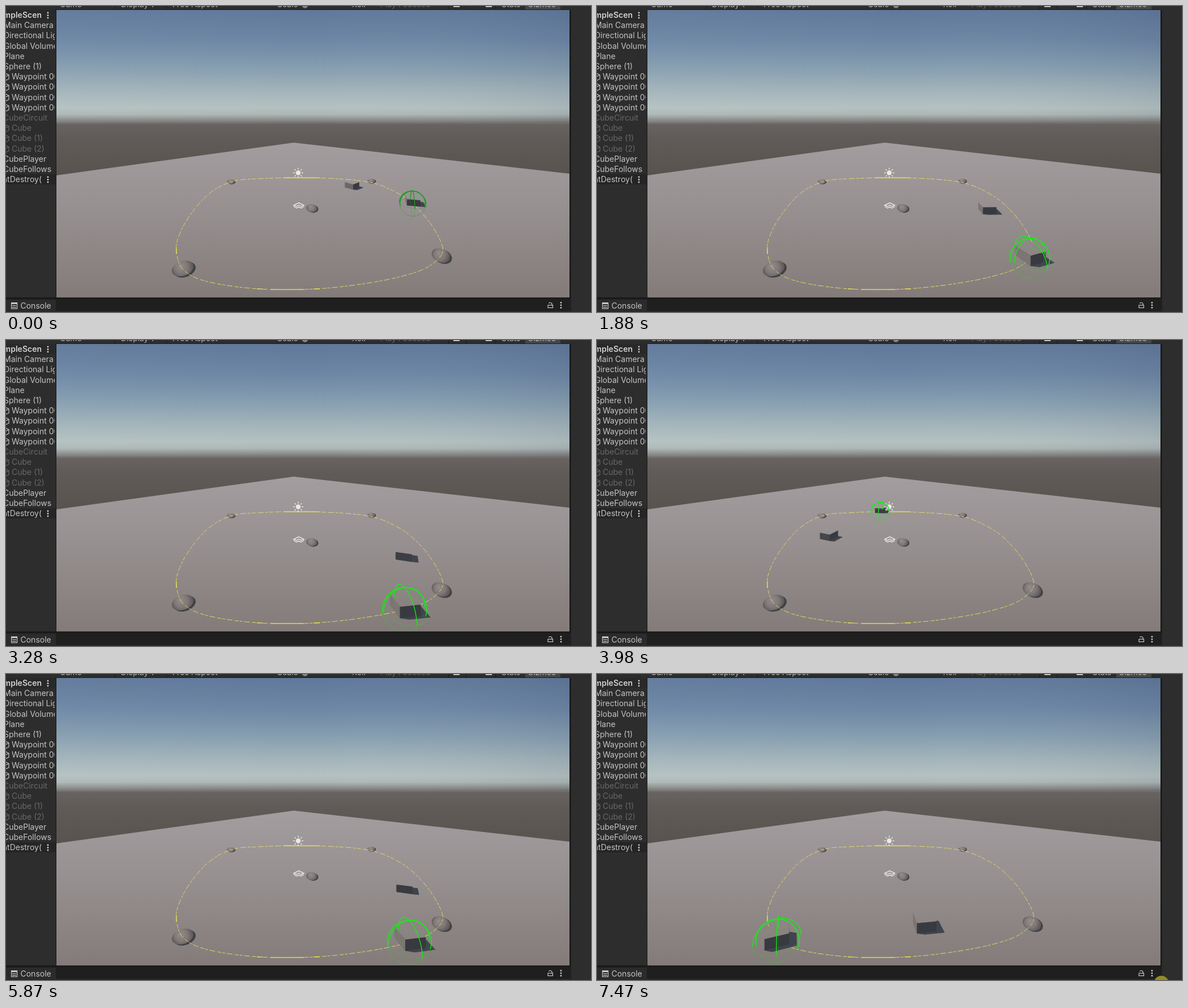
An HTML page with a canvas for the animation above (7680 ms loop, 1033 by 542 pixels).

```html
<!DOCTYPE html>
<html lang="en">
<head>
<meta charset="utf-8">
<title>Waypoint circuit</title>
<style>
html, body { margin: 0; width: 100%; height: 100%; overflow: hidden; background: #2d2d2d; }
canvas { display: block; }
</style>
</head>
<body>
<canvas id="stage" width="1033" height="542"></canvas>
<script>
const ctx = document.getElementById('stage').getContext('2d');
const LOOP = 7680;
const FONT = 'Inter, Roboto, sans-serif';
const VIEW = { x: 89, y: 7, w: 906, h: 510 };
const CAM = { x: 542, horizon: 180, focal: 441 };
const CUBE = 0.064, BALL = 0.131;

// Bursts of evenly spaced screen updates: start, end, count
const BURSTS = [
  [0, 0, 1], [70, 820, 12], [880, 1640, 12], [1710, 2440, 11], [2510, 3210, 11],
  [3280, 3980, 11], [4050, 4760, 11], [4830, 5590, 12], [5660, 6360, 11],
  [6430, 7190, 12], [7260, 7470, 4]
];

const CIRCUIT = [
  [358, 333], [399, 311], [445, 306], [520, 304], [600, 307], [650, 314], [687, 329],
  [718, 350], [750, 386], [771, 428], [760, 451], [725, 471], [650, 489], [548, 501],
  [445, 501], [355, 488], [313, 467], [301, 435], [305, 408], [324, 372]
];

// When the player passes which spot of the circuit
const PASSES = [
  [0, 718, 349], [820, 532, 501], [1150, 358, 333], [1640, 687, 328], [2440, 357, 333],
  [3280, 705, 482], [3980, 500, 304], [4690, 395, 497], [5590, 692, 331], [5870, 715, 480],
  [6360, 378, 321], [7190, 748, 460], [7470, 317, 474]
];

// Player spot -> follower spot
const CHASE = [
  [358, 333, 381, 395], [480, 305, 402, 355], [600, 307, 465, 333], [687, 329, 545, 325],
  [718, 349, 611, 321], [771, 428, 676, 355], [705, 482, 702, 385], [395, 497, 641, 431],
  [317, 474, 578, 447], [304, 410, 460, 432]
];

const WAYPOINTS = [
  [397, 311, 7, 4, 0], [645, 310, 7, 4, 0], [540, 358, 10, 7, 0.1],
  [768, 442, 17, 12, 0.4], [312, 465, 20, 13, -0.35]
];

const lerp = (a, b, k) => a + (b - a) * k;
const mod1 = v => v - Math.floor(v);
const toWorld = ([x, y]) => [(x - CAM.x) / (y - CAM.horizon), CAM.focal / (y - CAM.horizon)];
const project = (x, y, z) => [CAM.x + CAM.focal * x / z, CAM.horizon + CAM.focal * (1 - y) / z];

function spline(p, q, r, s, k) {
  return p.map((_, i) => 0.5 * (2 * q[i] + (r[i] - p[i]) * k +
    (2 * p[i] - 5 * q[i] + 4 * r[i] - s[i]) * k * k +
    (3 * q[i] - p[i] - 3 * r[i] + s[i]) * k * k * k));
}

function closedSpline(points, i, k) {
  const n = points.length, at = j => points[(i + j + n) % n];
  return spline(at(-1), at(0), at(1), at(2), k);
}

const track = [];
CIRCUIT.forEach((_, i) => {
  for (let k = 0; k < 24; k++) track.push({ p: closedSpline(CIRCUIT, i, k / 24) });
});
let trackLength = 0;
track.forEach((s, i) => {
  s.at = trackLength;
  const a = toWorld(s.p), b = toWorld(track[(i + 1) % track.length].p);
  trackLength += Math.hypot(b[0] - a[0], (b[1] - a[1]) * 0.75);
});
track.forEach(s => s.at /= trackLength);

function onTrack(lap) {
  const u = mod1(lap);
  let i = track.findIndex(s => s.at > u);
  if (i < 0) i = track.length;
  const a = track[i - 1], b = track[i % track.length];
  const k = (u - a.at) / ((i < track.length ? b.at : 1) - a.at);
  return [lerp(a.p[0], b.p[0], k), lerp(a.p[1], b.p[1], k)];
}

function lapAt(x, y) {
  const gap = s => Math.hypot(s.p[0] - x, s.p[1] - y);
  return track.reduce((best, s) => gap(s) < gap(best) ? s : best).at;
}

const timeline = [];
PASSES.forEach(([t, x, y]) => {
  let lap = lapAt(x, y);
  const last = timeline.length ? timeline[timeline.length - 1].lap : 0;
  while (lap < last) lap++;
  timeline.push({ t, lap });
});

function playerLap(t) {
  let i = 0;
  while (i < timeline.length - 2 && t >= timeline[i + 1].t) i++;
  const a = timeline[i], b = timeline[i + 1];
  const k = Math.min(1, (t - a.t) / (b.t - a.t));
  return lerp(a.lap, b.lap, i === 0 ? k * k : k);
}

const chase = CHASE.map(([x, y, fx, fy]) => ({ at: lapAt(x, y), p: [fx, fy] }))
  .sort((a, b) => a.at - b.at);
const chasePoints = chase.map(c => c.p);

function followerAt(lap) {
  const u = mod1(lap), n = chase.length;
  let i = n - 1;
  while (i > 0 && chase[i].at > u) i--;
  if (u < chase[0].at) i = n - 1;
  const a = chase[i].at, span = mod1(chase[(i + 1) % n].at - a);
  return closedSpline(chasePoints, i, mod1(u - a) / span);
}

function tick(t) {
  const [start, end, count] = BURSTS.filter(b => b[0] <= t + 8).pop();
  if (count === 1) return start;
  const step = (end - start) / (count - 1);
  return start + Math.min(count - 1, Math.floor((t + 8 - start) / step)) * step;
}

function gradient(y0, y1, stops) {
  const g = ctx.createLinearGradient(0, y0, 0, y1);
  stops.forEach(([y, color]) => g.addColorStop((y - y0) / (y1 - y0), color));
  return g;
}

const skyFill = gradient(7, 517, [
  [7, '#60789a'], [60, '#6c86a4'], [110, '#869eb0'], [150, '#a2b4ba'], [180, '#b4c1c1'],
  [192, '#adb7b6'], [203, '#858785'], [210, '#686360'], [235, '#605b58'], [300, '#59534f'], [517, '#59534f']
]);
const planeFill = gradient(242, 517, [[242, '#a29d9f'], [350, '#989192'], [430, '#8e8786'], [517, '#847b79']]);

function trace(points, close) {
  ctx.beginPath();
  points.forEach(([x, y], i) => i ? ctx.lineTo(x, y) : ctx.moveTo(x, y));
  if (close) ctx.closePath();
}
function poly(points, fill) { trace(points, true); ctx.fillStyle = fill; ctx.fill(); }
function rect(x, y, w, h, fill) { ctx.fillStyle = fill; ctx.fillRect(x, y, w, h); }
function disc(x, y, r, fill) {
  ctx.beginPath(); ctx.arc(x, y, r, 0, Math.PI * 2); ctx.fillStyle = fill; ctx.fill();
}
function label(text, x, y, color = '#c4c4c4', size = 14, weight = 400, align = 'left') {
  ctx.font = `${weight} ${size}px ${FONT}`;
  ctx.textAlign = align;
  ctx.fillStyle = color;
  ctx.fillText(text, x, y);
}
function menuDots(x, y, color) { for (let i = -1; i < 2; i++) disc(x, y + i * 4.5, 1.4, color); }

function drawScenery() {
  rect(VIEW.x, VIEW.y, VIEW.w, VIEW.h, skyFill);
  const shade = ctx.createLinearGradient(89, 0, 995, 0);
  shade.addColorStop(0, 'rgba(255,255,255,.03)');
  shade.addColorStop(0.5, 'rgba(255,255,255,0)');
  shade.addColorStop(1, 'rgba(30,30,60,.07)');
  rect(VIEW.x, VIEW.y, VIEW.w, 200, shade);
  poly([[508, 242], [995, 297], [995, 517], [89, 517], [89, 300]], planeFill);
}

function drawWaypoint([x, y, rx, ry, tilt]) {
  const oval = (dx, dy, fill) => {
    ctx.beginPath();
    ctx.ellipse(x + dx, y + dy, rx, ry, tilt, 0, Math.PI * 2);
    ctx.fillStyle = fill;
    ctx.fill();
  };
  oval(rx * 0.18, ry * 0.16, '#3f4046');
  const g = ctx.createRadialGradient(x - rx * 0.25, y - ry * 0.4, 1, x, y, rx * 1.15);
  g.addColorStop(0, '#928b89');
  g.addColorStop(0.5, '#7d7776');
  g.addColorStop(1, '#4b494b');
  oval(0, 0, g);
}

function drawCircuit() {
  ctx.lineWidth = 1;
  ctx.strokeStyle = '#e0dc62';
  ctx.setLineDash([10, 3, 5, 2, 7, 4]);
  trace(track.map(s => s.p), true);
  ctx.stroke();
  ctx.setLineDash([]);
  rect(491, 303.5, 62, 1.6, '#dfda50');
  rect(468, 501.5, 59, 1.4, '#dfda50');
  rect(443, 500.5, 9, 1.4, '#dfda50');
  rect(543, 500.5, 11, 1.4, '#dfda50');
  rect(300, 427, 1.5, 12, '#dfda50');
}

function drawIcons() {
  ctx.strokeStyle = '#eceae4';
  ctx.lineWidth = 1.4;
  for (let i = 0; i < 8; i++) {
    const c = Math.cos(i * Math.PI / 4), s = Math.sin(i * Math.PI / 4);
    trace([[516 + 6 * c, 295.5 + 6 * s], [516 + 9 * c, 295.5 + 9 * s]]);
    ctx.stroke();
  }
  disc(516, 295.5, 4.2, '#eceae4');
  trace([[508, 353], [517, 348.5], [526, 353], [521, 355], [517, 352.5], [513, 355]], true);
  ctx.stroke();
  trace([[508, 355], [513, 358], [517, 356], [521, 358], [526, 355]]);
  ctx.stroke();
}

function drawCube(spot, [hx, hz]) {
  const [cx, cz] = toWorld(spot);
  const size = Math.hypot(hx, hz) || 1;
  const ux = hx / size, uz = hz / size;
  const corners = [[1, 1], [-1, 1], [-1, -1], [1, -1]].map(([a, b]) =>
    [cx + CUBE * (a * ux - b * uz), cz + CUBE * (a * uz + b * ux)]);
  const base = corners.map(([x, z]) => project(x, 0, z));
  const top = corners.map(([x, z]) => project(x, CUBE, z));
  const cast = corners.map(([x, z]) => project(x + 0.05, 0, z - 0.012));
  const shadow = '#40444d';
  base.forEach((p, i) => {
    const j = (i + 1) % 4;
    poly([p, base[j], cast[j], cast[i]], shadow);
  });
  poly(cast, shadow);
  poly(top, planeFill);
  corners.forEach((p, i) => {
    const j = (i + 1) % 4, q = corners[j];
    const mx = (p[0] + q[0]) / 2, mz = (p[1] + q[1]) / 2;
    const nx = (mx - cx) / CUBE, nz = (mz - cz) / CUBE;
    if (nx * mx + nz * mz >= 0) return;
    const light = Math.min(1, Math.max(0, (-0.8 * nx + 0.25 * nz) * 2));
    const tone = [[56, 124], [58, 117], [64, 116]].map(([a, b]) => Math.round(lerp(a, b, light)));
    poly([base[i], base[j], top[j], top[i]], `rgb(${tone})`);
  });
}

function drawGizmo(spot, [hx, hz], color) {
  const [cx, cz] = toWorld(spot);
  const r = BALL * (spot[1] - CAM.horizon);
  const yaw = Math.atan2(hz, hx);
  const TAU = Math.PI * 2;
  const arc = (from, to, at, alpha, width) => {
    const points = [];
    for (let i = 0; i <= 32; i++) points.push(at(lerp(from, to, i / 32)));
    trace(points);
    ctx.globalAlpha = alpha;
    ctx.lineWidth = width;
    ctx.stroke();
  };
  ctx.strokeStyle = color;
  const rim = a => [spot[0] + r * Math.cos(a), spot[1] + r * Math.sin(a)];
  arc(-Math.PI - 0.2, 0.32, rim, 1, 1.4);
  arc(0.32, Math.PI - 0.2, rim, 0.25, 1);
  [yaw, yaw + Math.PI / 2].forEach(turn => {
    const meridian = a => project(cx + BALL * Math.cos(a) * Math.cos(turn),
      BALL * Math.sin(a), cz + BALL * Math.cos(a) * Math.sin(turn));
    arc(0, Math.PI, meridian, 1, 1.3);
    arc(Math.PI, TAU, meridian, 0.2, 1);
  });
  arc(0, TAU, a => project(cx + BALL * Math.cos(a), 0, cz + BALL * Math.sin(a)), 0.25, 1);
  ctx.globalAlpha = 1;
}

function drawToolbar() {
  rect(0, 0, 1033, 7, '#2d2d2d');
  rect(917, 0, 62, 6, '#464646');
  [['Game', 95], ['Display 1', 203], ['Free Aspect', 294], ['Scale', 479], ['Roll', 611],
    ['Stats', 875], ['Gizmos', 921]].forEach(([text, x]) => label(text, x, 2, '#b8b8b8'));
  label('Play Focused', 661, 2, '#666');
  disc(528, -1, 5, '#858585');
  [192, 283, 781, 812, 864].forEach(x => rect(x, 0, 1, 6, '#1c1c1c'));
  rect(790, 0, 11, 2, '#c4c4c4');
  rect(847, 0, 11, 2, '#c4c4c4');
  rect(88, 6, 908, 1, '#1c1c1c');
}

function drawHierarchy() {
  rect(0, 0, 88, 517, '#2d2d2d');
  rect(0, 7, 88, 18, '#292929');
  rect(0, 298, 88, 18, '#252525');
  ctx.save();
  ctx.beginPath();
  ctx.rect(0, 0, 86, 517);
  ctx.clip();
  const row = i => 21 + i * 18.2;
  label('SampleScen', 63, row(0), '#d2d2d2', 14, 600, 'right');
  ['Main Camera', 'Directional Light', 'Global Volume', 'Plane', 'Sphere (1)'].forEach((text, i) =>
    label(text, -4, row(i + 1)));
  for (let i = 0; i < 4; i++) child('Waypoint 00' + i, row(i + 6), '#c4c4c4');
  label('CubeCircuit', -5, row(10), '#686868');
  ['Cube', 'Cube (1)', 'Cube (2)'].forEach((text, i) => child(text, row(i + 11), '#686868'));
  label('CubePlayer', -5, row(14));
  label('CubeFollows', -5, row(15));
  label('DontDestroy(', 63, row(16), '#c4c4c4', 14, 400, 'right');
  ctx.restore();
  menuDots(74, 16.5, '#d0d0d0');
  menuDots(74, 307.5, '#d0d0d0');
  rect(88, 0, 1, 517, '#191919');
}

function child(text, y, color) {
  ctx.strokeStyle = color;
  ctx.lineWidth = 1.2;
  trace([[-1, y - 11], [5, y - 8], [5, y - 1], [-1, y + 2]]);
  ctx.stroke();
  trace([[5, y - 8], [-1, y - 5]]);
  ctx.stroke();
  label(text, 10, y, color);
}

function drawFrame() {
  rect(995, 0, 38, 542, '#2d2d2d');
  rect(995, 7, 2.5, 535, '#191919');
  rect(0, 516.5, 997, 26, '#1f1f1f');
  rect(0, 516.5, 997, 2, '#171717');
  rect(0, 520, 88, 20, '#2b2b2b');
  rect(0, 540, 997, 2, '#292929');
  ctx.strokeStyle = '#c8c8c8';
  ctx.lineWidth = 1.2;
  ctx.strokeRect(9.6, 525.6, 10, 10.5);
  rect(9, 525, 11, 3, '#c8c8c8');
  rect(11, 530, 7, 1.2, '#c8c8c8');
  rect(11, 533, 7, 1.2, '#c8c8c8');
  label('Console', 25.5, 536);
  ctx.strokeRect(957, 530, 8.5, 4.5);
  trace([[964, 530], [964, 527], [962, 525.5], [959.5, 525.5], [958.5, 527]]);
  ctx.stroke();
  menuDots(980, 530, '#c8c8c8');
}

function render(t) {
  const now = tick(t);
  const lap = playerLap(now);
  const player = onTrack(lap), follower = followerAt(lap);
  const toward = (a, b) => {
    const p = toWorld(a), q = toWorld(b);
    return [q[0] - p[0], q[1] - p[1]];
  };
  const heading = toward(player, onTrack(lap + 0.12));
  const cubes = [{ p: player, h: heading }, { p: follower, h: toward(follower, player) }];

  ctx.save();
  ctx.beginPath();
  ctx.rect(VIEW.x, VIEW.y, VIEW.w, VIEW.h);
  ctx.clip();
  drawScenery();
  WAYPOINTS.filter(([x, y, rx]) => Math.hypot(x - player[0], y - player[1]) > rx * 0.7).forEach(drawWaypoint);
  drawCircuit();
  cubes.sort((a, b) => a.p[1] - b.p[1]).forEach(c => drawCube(c.p, c.h));
  drawIcons();
  drawGizmo(player, heading, now < 70 ? '#1b9a22' : '#12f012');
  ctx.restore();

  drawHierarchy();
  drawToolbar();
  drawFrame();
  if (now > 7440) disc(996.5, 547.5, 13, '#948b22');
}

const began = performance.now();
function loop() {
  render((performance.now() - began) % LOOP);
  requestAnimationFrame(loop);
}
loop();
</script>
</body>
</html>
```
